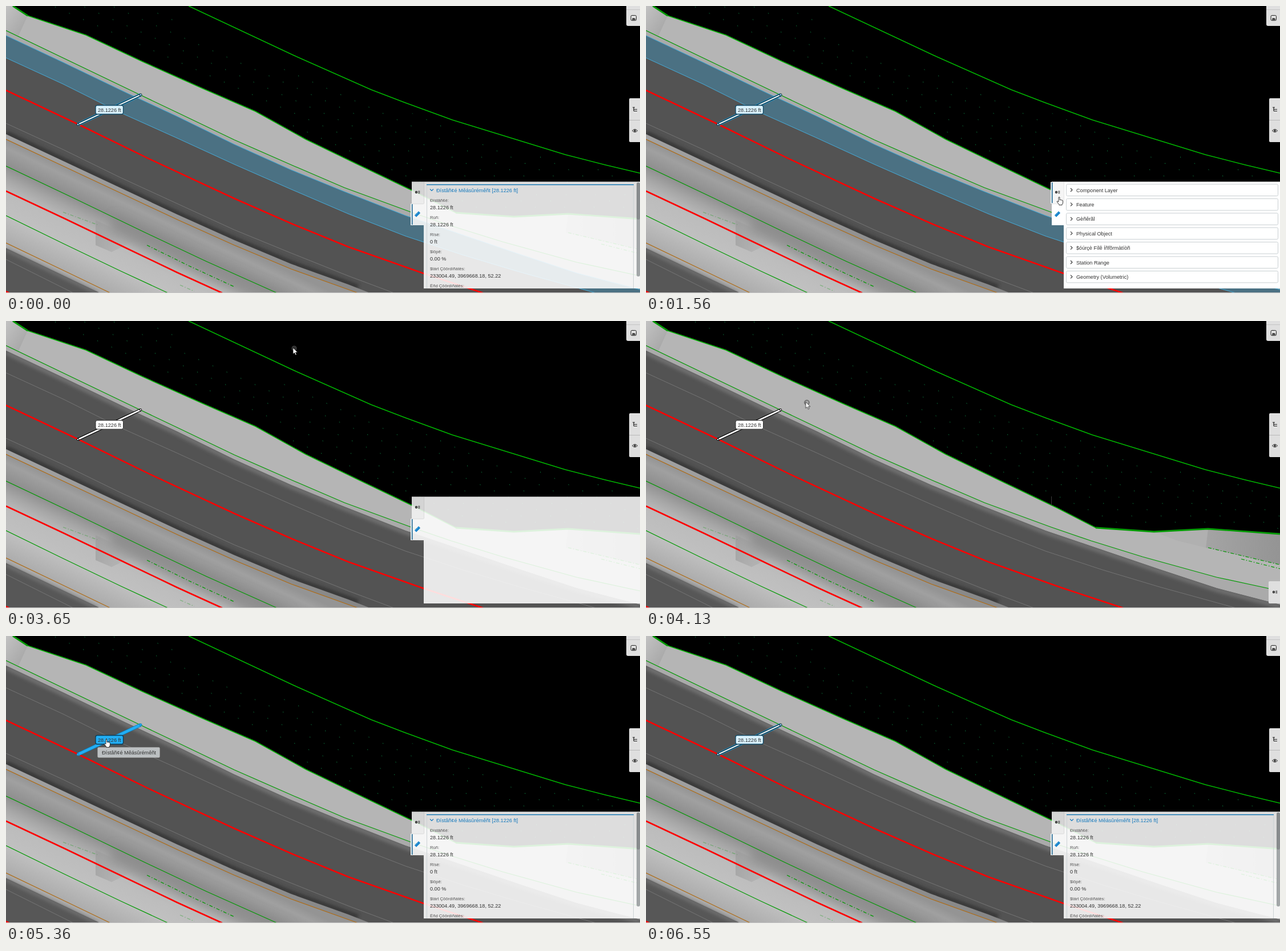
These frames come from a looping animation (1111 by 504 pixels, 7940 ms). An HTML page:

```html
<!DOCTYPE html>
<html lang="en">
<head>
<meta charset="utf-8">
<title>Distance measurement</title>
<style>
html, body { margin: 0; width: 100%; height: 100%; overflow: hidden; background: #000; }
svg { display: block; width: 1111px; height: 504px; }
text { font: 9.15px "Liberation Sans", Arial, sans-serif; fill: #333; }
.l { fill: none; }
.red { stroke: #f00; stroke-width: 2.5; }
.green { stroke: #009a00; stroke-width: 1.2; }
.edge { stroke: #00b400; stroke-width: 1.6; }
.thick { stroke: #009a00; stroke-width: 2.8; }
.orange { stroke: #b06a10; stroke-width: 1.2; }
.mark { stroke: #747474; stroke-width: 1; }
.btn { fill: #dfdfdf; }
.head { fill: #1479bd; }
.key { font-size: 7.7px; fill: #555; }

/* Hard switches */
.blue, .lit, .sel, .plain, .over, .tip, .panel, .mini, .info, .props, .bar2, .arrow, .hand, .tint, .cur {
  animation: 7.94s step-end infinite;
}
.blue { animation-name: blue; }
.lit { animation-name: lit; }
.sel { animation-name: sel; }
.plain { animation-name: plain; }
.over { animation-name: over; }
.tip { animation-name: tip; }
.panel { animation-name: panel; }
.mini { animation-name: mini; }
.info { animation-name: info; }
.props { animation-name: props; }
.bar2 { animation-name: bar2; }
.arrow { animation-name: arrow; }
.hand { animation-name: hand; }
.tint { animation-name: tint; }
.cur { animation-name: cur; }
@keyframes blue { 0% { opacity: 1 } 45.96%, 100% { opacity: 0 } }
@keyframes lit { 0% { opacity: 0 } 6.79% { opacity: 1 } 7.8%, 100% { opacity: 0 } }
@keyframes sel { 0% { opacity: 1 } 38% { opacity: 0 } 70%, 100% { opacity: 1 } }
@keyframes plain { 0% { opacity: 0 } 38% { opacity: 1 } 56.92%, 100% { opacity: 0 } }
@keyframes over { 0% { opacity: 0 } 56.92% { opacity: 1 } 70%, 100% { opacity: 0 } }
@keyframes tip { 0% { opacity: 0 } 60.57% { opacity: 1 } 70%, 100% { opacity: 0 } }
@keyframes panel { 0% { opacity: 1 } 48.1% { opacity: 0 } 64.6%, 100% { opacity: 1 } }
@keyframes mini { 0% { opacity: 0 } 48.1% { opacity: 1 } 64.6%, 100% { opacity: 0 } }
@keyframes info { 0% { opacity: 1 } 17.62% { opacity: 0 } 25.06% { opacity: 1 } 38% { opacity: 0 } 64.6%, 100% { opacity: 1 } }
@keyframes props { 0% { opacity: 0 } 17.62% { opacity: 1 } 25.06%, 100% { opacity: 0 } }
@keyframes bar2 { 0% { opacity: 1 } 17.62% { opacity: 0 } 25.06%, 100% { opacity: 1 } }
@keyframes arrow { 0% { opacity: 1 } 14.6% { opacity: 0 } 32% { opacity: 1 } 54% { opacity: 0 } 70%, 100% { opacity: 1 } }
@keyframes hand { 0% { opacity: 0 } 14.6% { opacity: 1 } 32% { opacity: 0 } 54% { opacity: 1 } 70%, 100% { opacity: 0 } }
@keyframes tint { 0% { fill: #fff } 54.6%, 100% { fill: #edf6fc } }
@keyframes cur { 0% { opacity: 0 } 2.89% { opacity: 1 } 76.5%, 100% { opacity: 0 } }

/* Smooth changes */
.glass { animation: glass 7.94s linear infinite; }
@keyframes glass {
  0%, 2.89% { opacity: .87 } 3.7% { opacity: .95 } 4.78%, 7.8% { opacity: .87 }
  8.81%, 32% { opacity: 1 } 35%, 72.5% { opacity: .87 }
  74.4%, 77.45% { opacity: 1 } 82.4%, 100% { opacity: .87 }
}
.move { animation: move 7.94s linear infinite; }
@keyframes move {
  0%, 2.89% { transform: translate(900px, 420px) }
  4.78%, 7.8% { transform: translate(663px, 338px) }
  8.81%, 10.7% { transform: translate(768px, 348px) }
  15.74%, 21% { transform: translate(723px, 335px) }
  24.5%, 31.36% { transform: translate(721px, 364px) }
  39.04%, 46.8% { transform: translate(503px, 47px) }
  54.6%, 55% { transform: translate(170px, 189px) }
  56.9%, 69.5% { transform: translate(175px, 181px) }
  74.43% { transform: translate(860px, 440px) }
  75.5%, 100% { transform: translate(923px, 483px) }
}
</style>
</head>
<body>
<svg viewBox="0 0 1111 504" xmlns="http://www.w3.org/2000/svg">
  <defs>
    <pattern id="dots" width="27" height="21" patternUnits="userSpaceOnUse" patternTransform="rotate(24) skewX(18)">
      <rect x="9" y="8" width="1.2" height="1.2" fill="#0a8040"/>
    </pattern>
    <linearGradient id="slope" gradientUnits="userSpaceOnUse" x1="0" y1="234" x2="-73.5" y2="390.6">
      <stop offset="0" stop-color="#949494"/>
      <stop offset=".08" stop-color="#a0a0a0"/>
      <stop offset=".24" stop-color="#8f8f8f"/>
      <stop offset=".36" stop-color="#a6a6a6"/>
      <stop offset=".5" stop-color="#bcbcbc"/>
      <stop offset=".7" stop-color="#c0c0c0"/>
      <stop offset="1" stop-color="#a9a9a9"/>
    </linearGradient>
    <linearGradient id="verge" gradientUnits="userSpaceOnUse" x1="0" y1="0" x2="620" y2="0">
      <stop offset="0" stop-color="#a2a2a2"/>
      <stop offset="1" stop-color="#868686"/>
    </linearGradient>
    <linearGradient id="corner" x1="0" y1="0" x2="1" y2="1">
      <stop offset="0" stop-color="#c2c2c2"/>
      <stop offset="1" stop-color="#a2a2a2"/>
    </linearGradient>
    <linearGradient id="facet" x1="0" y1="0" x2="1" y2="0">
      <stop offset="0" stop-color="#a4a4a4"/>
      <stop offset="1" stop-color="#949494"/>
    </linearGradient>
    <linearGradient id="patch" x1="0" y1="0" x2="1" y2="0">
      <stop offset="0" stop-color="#999" stop-opacity=".6"/>
      <stop offset="1" stop-color="#999" stop-opacity="0"/>
    </linearGradient>
    <filter id="soft" filterUnits="userSpaceOnUse" x="-20" y="-20" width="1160" height="560">
      <feGaussianBlur stdDeviation="3"/>
    </filter>
    <filter id="haze" filterUnits="userSpaceOnUse" x="-20" y="-20" width="1160" height="560">
      <feGaussianBlur stdDeviation="9"/>
    </filter>
    <path id="rim" d="M12 0L38 17 140 51 240 98 345 145 437 185 525 234 620 280 720 328 788 363 890 370 985 365 1111 374"/>
    <path id="curb" d="M0 52L100 99 210 152 300 194 400 243 500 288 593 326 700 368 800 402 900 436 1000 469 1111 498"/>
    <path id="lane" d="M0 91L100 137 200 187 300 232 400 278 500 322 600 365 700 404 800 437 900 467 1034 504"/>
    <path id="brow" d="M0 234L100 281 200 328 300 375 400 420 500 462 600 498 617 504"/>
    <path id="road" d="M0 52L100 99 210 152 300 194 400 243 500 288 593 326 700 368 800 402 900 436 1000 469 1111 498V504H638L600 489 500 453 400 411 300 366 200 319 100 272 0 225Z"/>
    <clipPath id="onRoad"><use href="#road"/></clipPath>
    <g id="infoIcon">
      <circle cx="-2" r="2.2" fill="#222"/>
      <path d="M-2-1v2" stroke="#ddd" stroke-width=".8"/>
      <path d="M1.3-1.8h3M1.3 0h3M1.3 1.8h3" stroke="#222" stroke-width=".9"/>
    </g>
  </defs>

  <!-- Terrain -->
  <rect width="1111" height="504"/>
  <path fill="url(#dots)" d="M50 0H210L290 15 345 62 440 105 528 114 610 147 700 184 900 255 1060 290 1111 322V366L985 357 890 362 795 355 720 318 525 224 437 176 240 88 140 42Z"/>
  <path class="l edge" d="M320 0L505 87 640 147 700 170 782 200 980 261 1050 279 1111 293.500"/>
  <path fill="#b5b5b5" d="M0 0H12L38 17 140 51 240 98 345 145 437 185 525 234 620 280 720 328 788 363 890 370 985 365 1111 374V504H0Z"/>
  <path fill="url(#corner)" d="M0 0H12L38 17 22 52 0 43Z"/>
  <path class="lit" fill="#cdcdcd" d="M38 17L140 51 240 98 345 145 437 185 525 234 620 280 720 328 788 363 890 370 880 415 780 386 710 362 600 322 500 279 400 235 300 187 235 156 22 53Z"/>
  <path fill="#b0b0b0" d="M890 370L985 365 981 398 932 386Z"/>
  <path fill="url(#facet)" d="M985 365L1111 374V428L981 398Z"/>
  <path fill="#aaa" d="M0 43L235 156 300 187 400 235 500 279 593 319 710 362 780 386 870 414 1000 450 1111 474V504H0Z"/>

  <!-- Median -->
  <path fill="url(#verge)" d="M0 215L200 309 400 401 500 443 640 495V504H0Z"/>
  <path fill="url(#slope)" d="M0 234L100 281 200 328 300 375 400 420 500 462 600 498 617 504H0Z"/>
  <path class="l" d="M185 382L260 418 365 468 490 524" stroke="#868686" stroke-opacity=".6" stroke-width="30" filter="url(#haze)"/>
  <path fill="url(#patch)" d="M157 376L230 410 185 432 157 420Z"/>
  <path fill="#575757" d="M0 425L165 504H0Z"/>
  <path class="l" d="M0 428L160 504" stroke="#777" stroke-width="5" filter="url(#soft)"/>
  <path class="l mark" d="M0 445L118 504"/>

  <!-- Road -->
  <use href="#road" fill="#535353"/>
  <g clip-path="url(#onRoad)">
    <use href="#curb" class="l" y="3" stroke="#747474" stroke-width="7" filter="url(#soft)"/>
    <use href="#brow" class="l" y="-11" stroke="#303030" stroke-width="7" filter="url(#soft)"/>
  </g>
  <g class="blue">
    <path fill="#4b7183" d="M0 52L100 99 210 152 300 194 400 243 500 288 593 326 700 368 800 402 900 436 1000 469 1111 498V504H1034L900 467 800 437 700 404 600 365 500 322 400 278 300 232 200 187 100 137 0 91Z"/>
    <use href="#curb" class="l" stroke="#3aa6d6"/>
  </g>
  <use href="#lane" class="l mark"/>
  <use href="#lane" class="l blue" stroke="#3aa6d6"/>
  <path class="l mark" d="M0 206L100 252 200 301 300 347 400 393 500 434 600 474 680 504"/>

  <!-- Line work -->
  <use href="#rim" class="l edge"/>
  <path class="l thick" d="M12 0L38 17M788 363L890 370 985 365 1111 374"/>
  <path class="l green" d="M0 43L235 156 300 187 400 235 500 279 593 319 710 362 780 386 870 414 1000 450 1111 474"/>
  <path class="l green" d="M0 281L120 338 240 396 350 448 475 504M0 368L100 417 200 465 284 504"/>
  <use href="#brow" class="l orange"/>
  <path class="l orange" d="M0 416L100 464 183 504"/>
  <path class="l red" d="M0 148L127 208 250 268 400 338 500 382 600 423 730 469 836 504M0 325L100 372 200 420 300 468 379 504M0 501L6 504"/>
  <g class="l green" stroke-dasharray="6 3 1.5 3">
    <path d="M247 420L320 456 400 493M985 398L1111 428M1043 418L1111 435"/>
    <path d="M100 362L160 384M305 490L330 501" opacity=".35"/>
  </g>
  <rect y="503" width="1111" height="1" fill="#c4c4c4"/>

  <!-- Measurement -->
  <g class="plain" stroke="#000">
    <path d="M126 208L236 156" stroke-width="5"/>
    <path d="M126 208L236 156" stroke="#fff" stroke-width="2.6"/>
    <circle cx="126" cy="208" r="1.7" fill="#fff"/><circle cx="236" cy="156" r="1.7" fill="#fff"/>
    <rect class="tint" x="157" y="174.5" width="48.5" height="15.5" rx="3" stroke="#333"/>
  </g>
  <g class="sel" stroke="#06222f">
    <path d="M126 208L236 156" stroke="#1b9ad6" stroke-width="6.2"/>
    <path d="M126 208L236 156" stroke-width="4.6"/>
    <path d="M126 208L236 156" stroke="#dcf3ff" stroke-width="2.4"/>
    <circle cx="126" cy="208" r="2" fill="#8fd4f5"/><circle cx="236" cy="156" r="2" fill="#8fd4f5"/>
    <rect x="157" y="174.5" width="48.5" height="15.5" rx="3" fill="#d9f1fd" stroke="#124a66" stroke-width="1.3"/>
  </g>
  <g class="over" stroke="#0d7fbd">
    <path d="M126 208L236 156" stroke-width="6.2"/>
    <path d="M126 208L236 156" stroke="#22aef4" stroke-width="4.6"/>
    <circle cx="126" cy="208" r="2" fill="#22aef4"/><circle cx="236" cy="156" r="2" fill="#22aef4"/>
    <rect x="157" y="174.5" width="48.5" height="15.5" rx="3" fill="#22aef4" stroke="#0a3c58" stroke-width="1.3"/>
  </g>
  <text x="161" y="185.5">28.1226 ft</text>
  <g class="tip">
    <rect x="160.5" y="195.5" width="109" height="18" rx="2" fill="#bcc0c2" stroke="#999" stroke-width=".6"/>
    <text x="168" y="207.5">Ðístâñ¢é Mêásûrémêñt</text>
  </g>

  <!-- Side buttons -->
  <path class="btn" d="M1087 0H1111V35H1090Q1087 35 1087 32Z"/>
  <path d="M1087 6.5H1111" stroke="#c4c4c4"/>
  <g fill="none" stroke="#222">
    <rect x="1095" y="16.5" width="9.5" height="9" rx="2"/>
    <path d="M1097 24l2-3 1.5 1.5 1-1 1.5 2.5z" fill="#222" stroke-width=".6"/>
  </g>
  <rect class="btn" x="1092" y="162" width="22" height="77" rx="2"/>
  <path d="M1092 200.5H1111" stroke="#b8b8b8"/>
  <path d="M1098 178h4M1100 181.5h6M1100 184.5h6M1100 178v6.5" fill="none" stroke="#222" stroke-width="1.2"/>
  <path d="M1097.5 219q4.5-5 9 0q-4.5 5-9 0z" fill="none" stroke="#222"/>
  <circle cx="1102" cy="219" r="1.7" fill="#222"/>
  <g class="mini">
    <path d="M710.5 308V324" stroke="#3c3c3c"/>
    <rect class="btn" x="1091" y="457" width="22" height="39" rx="2"/>
    <use href="#infoIcon" x="1102" y="476"/>
  </g>

  <!-- Panel -->
  <g class="panel">
    <path class="glass" fill="#fff" d="M711 308.5H1111V496H732V385H711Z"/>
    <path d="M711 347.5H732M732.5 309V347" stroke="#000" stroke-opacity=".1"/>
    <path d="M711 309H732V347H711Z" fill="#000" fill-opacity=".04"/>
    <use href="#infoIcon" x="721" y="327"/>
    <g transform="translate(721 365.5) rotate(-45)">
      <rect x="-5" y="-2.2" width="10" height="4.4" rx=".6" fill="#1583cc"/>
      <path d="M-3-2v2M-1-2v1.5M1-2v2M3-2v1.5" stroke="#9fd0ee" stroke-width=".6"/>
    </g>
    <g class="bar2">
      <rect x="709" y="347" width="2" height="38" fill="#e8eef1"/>
      <rect x="711" y="348" width="1.5" height="36" fill="#17638f"/>
    </g>
    <g class="props">
      <rect x="709" y="309" width="2" height="38" fill="#e8eef1"/>
      <rect x="711" y="310" width="1.5" height="36" fill="#17638f"/>
    </g>
    <g class="info" id="info">
      <path d="M737.5 314V496M1099.5 314V496" stroke="#ccd2d5"/>
      <rect x="737" y="313" width="363" height="1.5" fill="#1b7ab3"/>
      <path d="M743 321.5l3 3 3-3" fill="none" stroke="#1479bd" stroke-width="1.2"/>
      <text class="head" x="754" y="326.5">Ðístâñ¢é Mêásûrémêñt [28.1226 ft]</text>
      <rect x="1105" y="310" width="6" height="165" rx="3" fill="#a2a6a8"/>
      <rect x="1105" y="310" width="6" height="65" rx="3" fill="#878b8d"/>
    </g>
    <g class="props" id="props"></g>
  </g>

  <!-- Pointer -->
  <g class="cur"><g class="move">
    <g class="arrow">
      <circle cx="2" cy="1" r="4" fill="#888" fill-opacity=".35" stroke="#444" stroke-width="1.1"/>
      <path d="M0 0V11l2.6-2.3 1.7 4 1.8-.8-1.7-3.8h3.5z" fill="#fff" stroke="#111" stroke-width=".7"/>
    </g>
    <path class="hand" fill="#fff" stroke="#111" stroke-width=".8" stroke-linejoin="round" d="M0 1q1-1.5 2 0v4.5q1-.9 1.9.2 1-.7 1.8.4 1.6-.5 1.7 1V10q0 2-1.3 3.2V14.5H.8V13.5L-2.7 9q-.4-1.6 1.2-1.1L0 9z"/>
  </g></g>
</svg>
<script>
const add = (parent, tag, attrs, label) => {
  const el = document.createElementNS("http://www.w3.org/2000/svg", tag);
  for (const name in attrs) el.setAttribute(name, attrs[name]);
  if (label) el.textContent = label;
  parent.append(el);
};
const info = document.getElementById("info");
const props = document.getElementById("props");

[["Ðístâñ¢é:", "28.1226 ft"], ["Rúñ:", "28.1226 ft"], ["Rïsè:", "0 ft"], ["$lôpê:", "0.00 %"],
 ["$tárt Çôôrdíñátès:", "233004.49, 3969668.18, 52.22"], ["Ëñd Çôôrdíñátès:", ""]].forEach(([key, value], i) => {
  const y = 344 + i * 30;
  add(info, "text", { class: "key", x: 743, y }, key);
  if (value) add(info, "text", { x: 743, y: y + 13.3 }, value);
});

["Component Layer", "Feature", "Gèñêrãl", "Physical Object", "$óúrçè Fílê Íñfõrmàtíòñ",
 "Station Range", "Geometry (Volumetric)"].forEach((name, i) => {
  const y = 323 + i * 25.4;
  add(props, "rect", { x: 736.5, y: y - 10, width: 371, height: 20.5, rx: 2, fill: "#fff", stroke: "#c9cfd2" });
  add(props, "path", { d: `M744 ${y - 3}l3 3-3 3`, fill: "none", stroke: "#333", "stroke-width": 1.1 });
  add(props, "text", { x: 754, y: y + 3.5 }, name);
});
</script>
</body>
</html>
```
